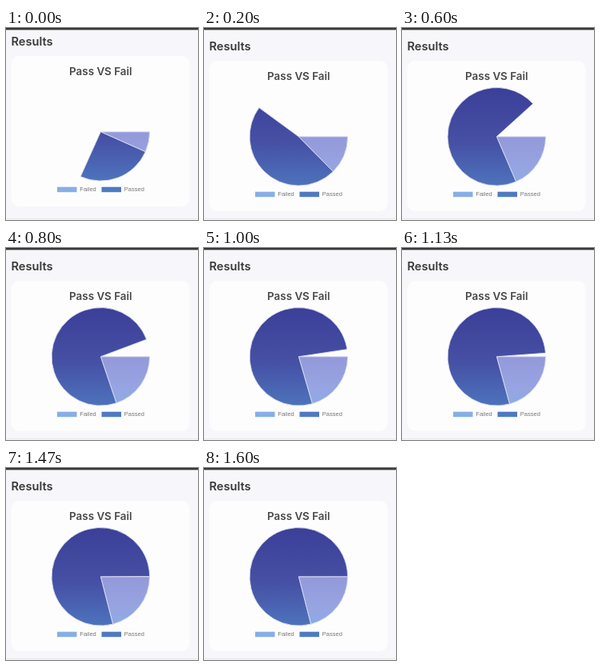
Write an HTML page with a canvas that moves like this. It is 240 by 240 pixels and loops after 1670 ms.

```html
<!DOCTYPE html>
<html lang="en">
<head>
<meta charset="utf-8">
<title>Results</title>
<style>
  html, body { margin: 0; width: 100%; height: 100%; overflow: hidden; background: #f7f7fb; }
  canvas { display: block; width: 240px; height: 240px; }
</style>
</head>
<body>
<canvas id="stage"></canvas>
<script>
const LOOP = 1670;
const STEP = 1000 / 15;
const LAST_STEP = 24;
const FAILED_SHARE = 0.21;
const PIE = { x: 118.3, y: 135.8, r: 61.3 };

const canvas = document.getElementById('stage');
const ctx = canvas.getContext('2d');
const scale = window.devicePixelRatio || 1;
canvas.width = canvas.height = 240 * scale;

function verticalGradient(top, bottom, colors) {
  const gradient = ctx.createLinearGradient(0, top, 0, bottom);
  colors.forEach((color, i) => gradient.addColorStop(i / (colors.length - 1), color));
  return gradient;
}

const failedFill = verticalGradient(136, 211, ['#9399da', '#97a4e2', '#84b0e6']);
const passedFill = verticalGradient(75, 211, ['#3b3f98', '#4650a4', '#4f7cc3']);

function text(label, x, y, font, color, align = 'left') {
  ctx.font = font;
  ctx.fillStyle = color;
  ctx.textAlign = align;
  ctx.fillText(label, x, y);
}

function slice(from, to, fill) {
  ctx.beginPath();
  ctx.moveTo(PIE.x, PIE.y);
  ctx.arc(PIE.x, PIE.y, PIE.r, from, to);
  ctx.closePath();
  ctx.fillStyle = fill;
  ctx.fill();
  ctx.strokeStyle = '#dcdff0';
  ctx.lineWidth = 0.9;
  ctx.stroke();
}

function legendItem(label, x, fill) {
  ctx.fillStyle = fill;
  ctx.fillRect(x, 204.7, 24.5, 6.5);
  text(label, x + 28.3, 210, '7.5px "Liberation Sans", sans-serif', '#777');
}

// Quartic ease-out; the sweep runs slightly faster at the start.
function sweepProgress(ms) {
  const t = ms < 400 ? 0.091 + 0.00057 * ms : 0.319 + 0.00048 * (ms - 400);
  return 1 - (1 - Math.min(t, 1)) ** 4;
}

function draw(ms) {
  ctx.setTransform(scale, 0, 0, scale, 0, 0);
  ctx.fillStyle = '#f7f7fb';
  ctx.fillRect(0, 0, 240, 240);

  const lift = -6 * Math.max(0, 1 - ms / 200) ** 2;
  ctx.save();
  ctx.translate(0, lift);

  text('Results', 6.5, 27.8, '600 14.6px Inter, sans-serif', '#383838');

  ctx.fillStyle = '#fdfdfd';
  ctx.beginPath();
  ctx.roundRect(6.5, 41, 223, 188, 10);
  ctx.fill();

  text('Pass VS Fail', 118.3, 64.7, '600 13.4px Inter, sans-serif', '#484848', 'center');

  const sweep = sweepProgress(ms) * Math.PI * 2;
  slice(0, sweep * FAILED_SHARE, failedFill);
  slice(sweep * FAILED_SHARE, sweep, passedFill);

  legendItem('Failed', 64, failedFill);
  legendItem('Passed', 119.5, passedFill);
  ctx.restore();

  ctx.fillStyle = '#3a3636';
  ctx.fillRect(0, 0, 240, 2.4);
  ctx.fillStyle = '#e6e6e8';
  ctx.fillRect(0, 238, 240, 1);
}

const start = performance.now();

function tick() {
  const ms = (performance.now() - start) % LOOP;
  const step = Math.min(LAST_STEP, Math.floor((ms + 4) / STEP));
  draw(step * STEP);
  requestAnimationFrame(tick);
}
tick();
</script>
</body>
</html>
```
